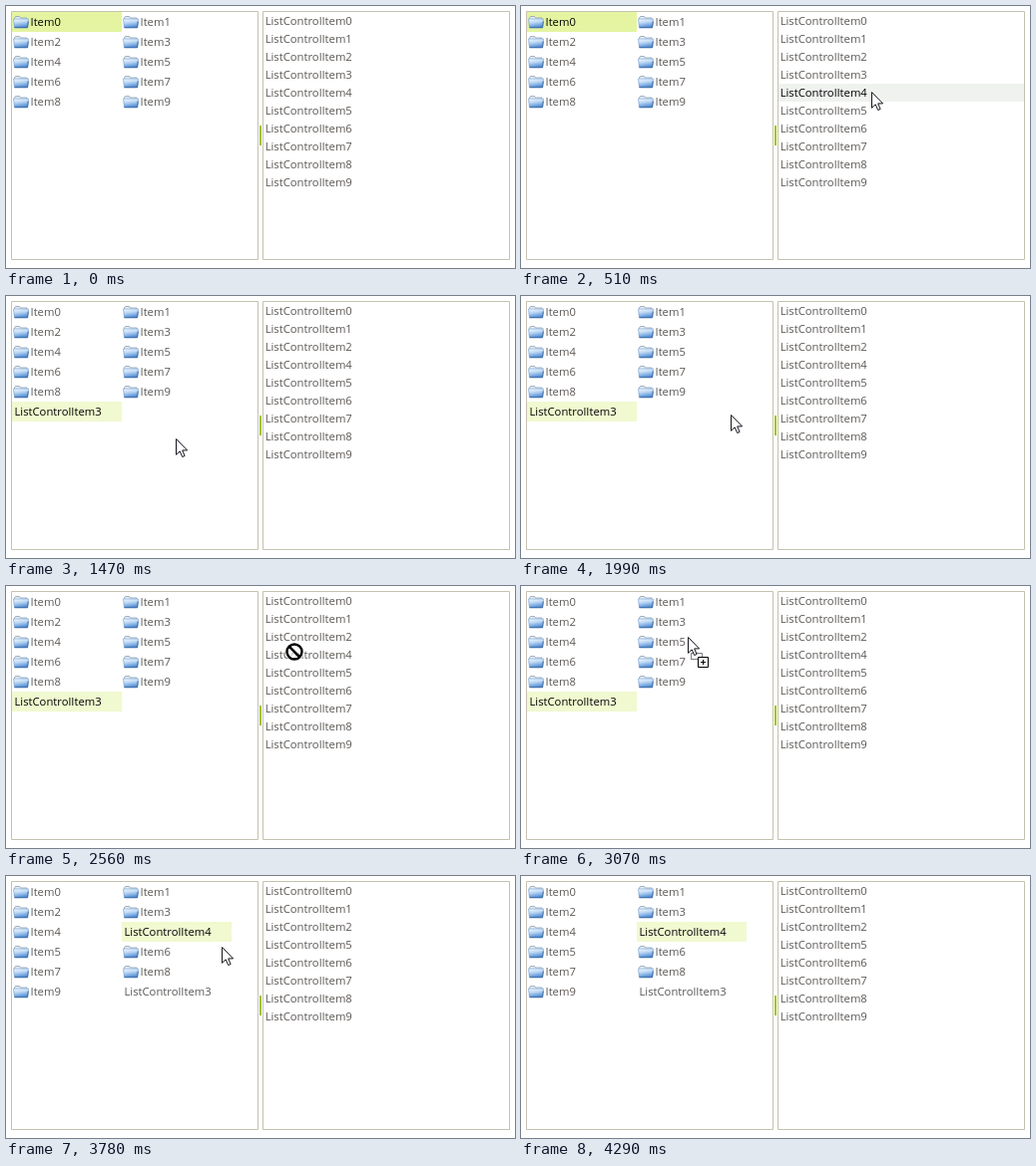
Write an HTML page that moves like this. It is 510 px wide and 263 px high and loops after 4.54 s.

```html
<!DOCTYPE html>
<html lang="en">
<head>
<meta charset="utf-8">
<title>Drag and drop between lists</title>
<style>
  html, body { margin: 0; width: 100%; height: 100%; overflow: hidden; background: #fff; }
  svg { display: block; width: 510px; height: 263px; }
  text { font: 11.25px "Open Sans", "Noto Sans", sans-serif; fill: #5b5754; }
  text.active { fill: #000; }
</style>
</head>
<body>
<svg id="stage" viewBox="0 0 510 263">
  <defs>
    <linearGradient id="body" x1="0" y1="0" x2="0.25" y2="1">
      <stop offset="0" stop-color="#f4faff"/>
      <stop offset="0.45" stop-color="#c0daf5"/>
      <stop offset="1" stop-color="#5690d6"/>
    </linearGradient>
    <g id="folder">
      <path d="M1.5 11V2.5L2.5 1H6.5L7.5 2.5H14V11Z" fill="#e6edf4" stroke="#8b9db3" stroke-width=".8"/>
      <path d="M.5 3.5H15.5L14.5 12.2H1.5Z" fill="url(#body)" stroke="#7fa6d3" stroke-width=".7"/>
      <path d="M1.5 12.2H14.6L15.3 6" fill="none" stroke="#2f609f" stroke-width=".9"/>
    </g>
    <path id="arrow" d="M.5.5V16.3L4.2 12.8L6.7 18.5L9.1 17.5L6.7 11.9H11.6Z"
      fill="#fff" stroke="#14141c"/>
    <g id="copy">
      <path d="M3.5 16.5H14.5V22.5H3.5Z" fill="none" stroke="#000" stroke-dasharray="1 1"/>
      <path d="M10.5 20.5H20.5V30.5H10.5Z" fill="#fff" stroke="#000"/>
      <path d="M13 25.5H18M15.5 23V28" stroke="#000"/>
      <use href="#arrow"/>
    </g>
    <g id="stop" fill="none">
      <circle r="7.5" stroke="#fff" stroke-width="4"/>
      <circle r="7.5" fill="#fff" fill-opacity=".6" stroke="#000" stroke-width="2.4"/>
      <path d="M-5.3-5.3L5.3 5.3" stroke="#000" stroke-width="2.6"/>
    </g>
  </defs>
  <g fill="#fff" stroke="#c5c2b0">
    <path d="M5.5 5.5H252.5V254.5H5.5Z"/>
    <path d="M257.5 5.5H504.5V254.5H257.5Z"/>
  </g>
  <rect x="254" y="120" width="2" height="20" fill="#9fc41c"/>
  <g id="scene"></g>
</svg>
<script>
const LOOP = 4540;
const FOCUSED = '#e4f4a0', BLURRED = '#f1f9d0';
const scene = document.getElementById('scene');

const names = (prefix, skip = []) =>
  Array.from({ length: 10 }, (_, i) => prefix + i).filter((_, i) => !skip.includes(i));
const listName = i => 'ListControlItem' + i;
const folders = names('Item');

const layouts = {
  start: { left: folders, right: names('ListControlItem'), selected: 'Item0' },
  first: {
    left: [...folders, listName(3)],
    right: names('ListControlItem', [3]),
    selected: listName(3)
  },
  second: {
    left: [...folders.slice(0, 5), listName(4), ...folders.slice(5), listName(3)],
    right: names('ListControlItem', [3, 4]),
    selected: listName(4)
  }
};

// time, layout, selection colour, pointer, x, y, hovered row on the right
const steps = [
  [0, 'start', FOCUSED],
  [120, 'start', FOCUSED, 'arrow', 421, 183, 9],
  [240, 'start', FOCUSED, 'arrow', 378, 117, 6],
  [390, 'start', FOCUSED, 'arrow', 361, 98, 5],
  [510, 'start', FOCUSED, 'arrow', 351, 86, 4],
  [660, 'start', FOCUSED, 'arrow', 347, 80, 4],
  [780, 'start', FOCUSED, 'arrow', 339, 74, 3],
  [930, 'start', BLURRED, 'stop', 322, 84],
  [1050, 'start', BLURRED, 'stop', 290, 96],
  [1200, 'start', BLURRED, 'copy', 187, 135],
  [1350, 'start', BLURRED, 'copy', 170, 143],
  [1470, 'first', BLURRED, 'arrow', 170, 143],
  [1990, 'first', BLURRED, 'arrow', 210, 119],
  [2120, 'first', BLURRED, 'arrow', 260, 92],
  [2260, 'first', BLURRED, 'arrow', 292, 78, 4],
  [2410, 'first', BLURRED, 'arrow', 302, 70, 3],
  [2560, 'first', BLURRED, 'stop', 289, 66],
  [2680, 'first', BLURRED, 'copy', 226, 65],
  [2800, 'first', BLURRED, 'copy', 174, 67],
  [2950, 'first', BLURRED, 'copy', 169, 57],
  [3070, 'first', BLURRED, 'copy', 167, 51],
  [3190, 'second', BLURRED, 'arrow', 167, 51],
  [3780, 'second', BLURRED, 'arrow', 216, 71],
  [3900, 'second', BLURRED, 'arrow', 346, 136, 7],
  [4020, 'second', BLURRED, 'arrow', 477, 200],
  [4170, 'second', BLURRED, 'arrow', 481, 237],
  [4290, 'second', BLURRED]
];

function add(tag, attributes, content = '') {
  const node = document.createElementNS('http://www.w3.org/2000/svg', tag);
  for (const [key, value] of Object.entries(attributes)) node.setAttribute(key, value);
  node.textContent = content;
  scene.append(node);
}

function drawRow(label, x, y, active) {
  add('text', { x, y, class: active ? 'active' : '' }, label);
}

function draw([, layoutName, selectionColor, pointer, px, py, hovered]) {
  const { left, right, selected } = layouts[layoutName];
  scene.replaceChildren();

  left.forEach((label, i) => {
    const x = 6 + 110 * (i % 2);
    const y = 6 + 20 * Math.floor(i / 2);
    const isFolder = label.startsWith('Item');
    const active = label === selected;
    if (active) add('rect', { x, y, width: 110, height: 20, fill: selectionColor });
    if (isFolder) add('use', { href: '#folder', x: x + 1, y: y + 3.5 });
    drawRow(label, x + (isFolder ? 18.5 : 2.5), y + 14, active);
  });

  right.forEach((label, i) => {
    const y = 6 + 18 * i;
    const active = i === hovered;
    if (active) add('rect', { x: 258, y, width: 246, height: 18, fill: '#f0f2f0' });
    drawRow(label, 259.7, y + 13, active);
  });

  if (pointer) add('use', { href: '#' + pointer, x: px, y: py });
}

let shown;
function tick() {
  const time = performance.now() % LOOP;
  const step = steps.findLast(([start]) => start <= time);
  if (step !== shown) draw(shown = step);
  requestAnimationFrame(tick);
}
tick();
</script>
</body>
</html>
```
